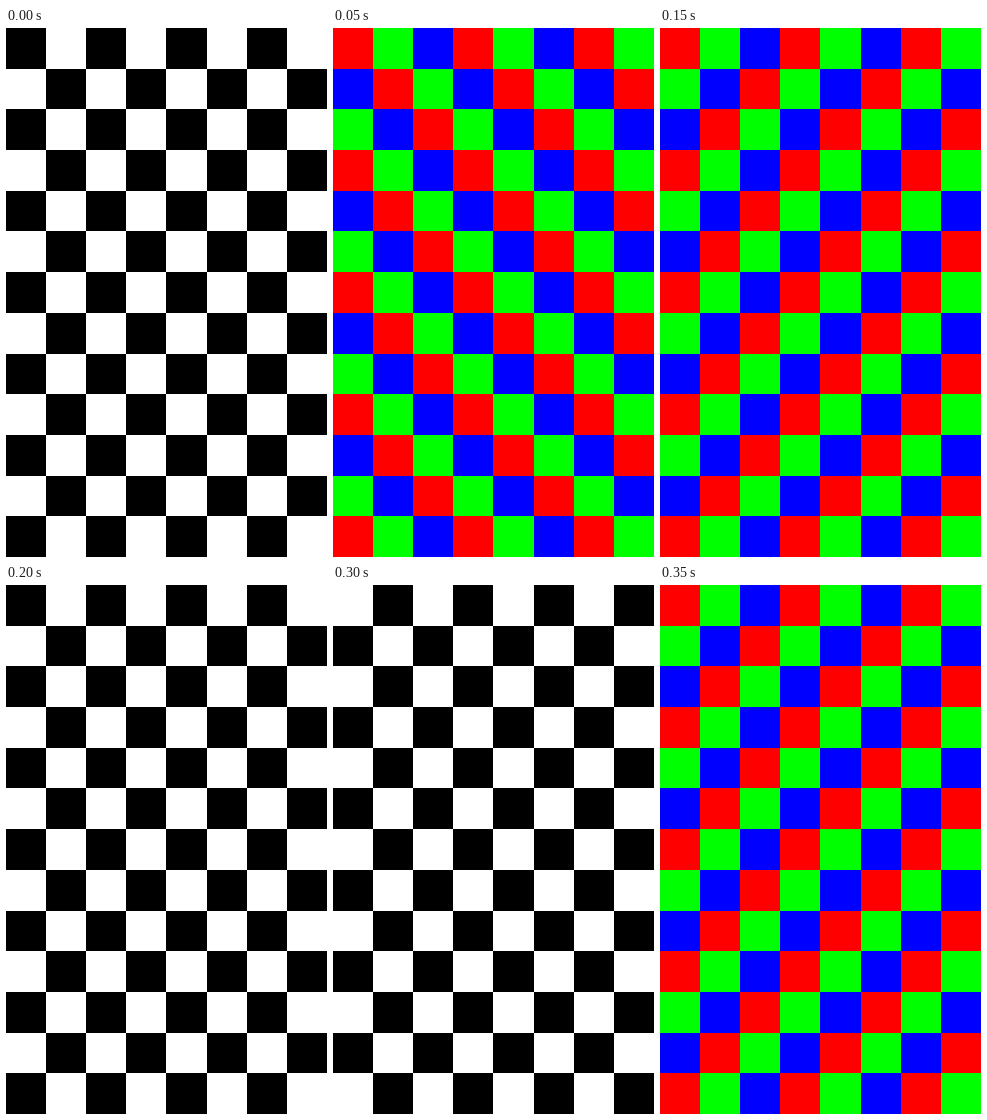
These frames come from a looping animation (321x529 px, 400 ms). An HTML page with a canvas:

```html
<!DOCTYPE html>
<html lang="en">
<head>
<meta charset="utf-8">
<title>Flashing checks</title>
<style>
  html, body { margin: 0; width: 100%; height: 100%; overflow: hidden; background: #fff; }
  canvas {
    position: absolute; inset: 0; width: 100%; height: 100%;
    visibility: hidden;
    animation: flash 200ms step-end infinite;
  }
  @keyframes flash {
    0% { visibility: visible; }
    25%, 100% { visibility: hidden; }
  }
</style>
</head>
<body>
<script>
  const WIDTH = 321, HEIGHT = 529, COLS = 8, ROWS = 13;
  const STEP = 50;
  const MONO = ['#000', '#fff'];
  const RGB = ['#f00', '#0f0', '#00f'];

  // Each board picks a colour index from the column and row.
  const boards = [
    { colors: MONO, index: (c, r) => c + r },
    { colors: RGB, index: (c, r) => c - r + 15 },
    { colors: MONO, index: (c, r) => c + r + 1 },
    { colors: RGB, index: (c, r) => c + r }
  ];

  const edge = (i, size, count) => Math.round(i * size / count - 0.01);

  function drawBoard({ colors, index }) {
    const canvas = document.createElement('canvas');
    canvas.width = WIDTH;
    canvas.height = HEIGHT;
    const ctx = canvas.getContext('2d');
    for (let r = 0; r < ROWS; r++) {
      const y = edge(r, HEIGHT, ROWS);
      for (let c = 0; c < COLS; c++) {
        const x = edge(c, WIDTH, COLS);
        ctx.fillStyle = colors[index(c, r) % colors.length];
        ctx.fillRect(x, y, edge(c + 1, WIDTH, COLS) - x, edge(r + 1, HEIGHT, ROWS) - y);
      }
    }
    return canvas;
  }

  boards.forEach((board, i) => {
    const canvas = drawBoard(board);
    canvas.style.animationDelay = `${(i - boards.length) * STEP}ms`;
    document.body.append(canvas);
  });
</script>
</body>
</html>
```
